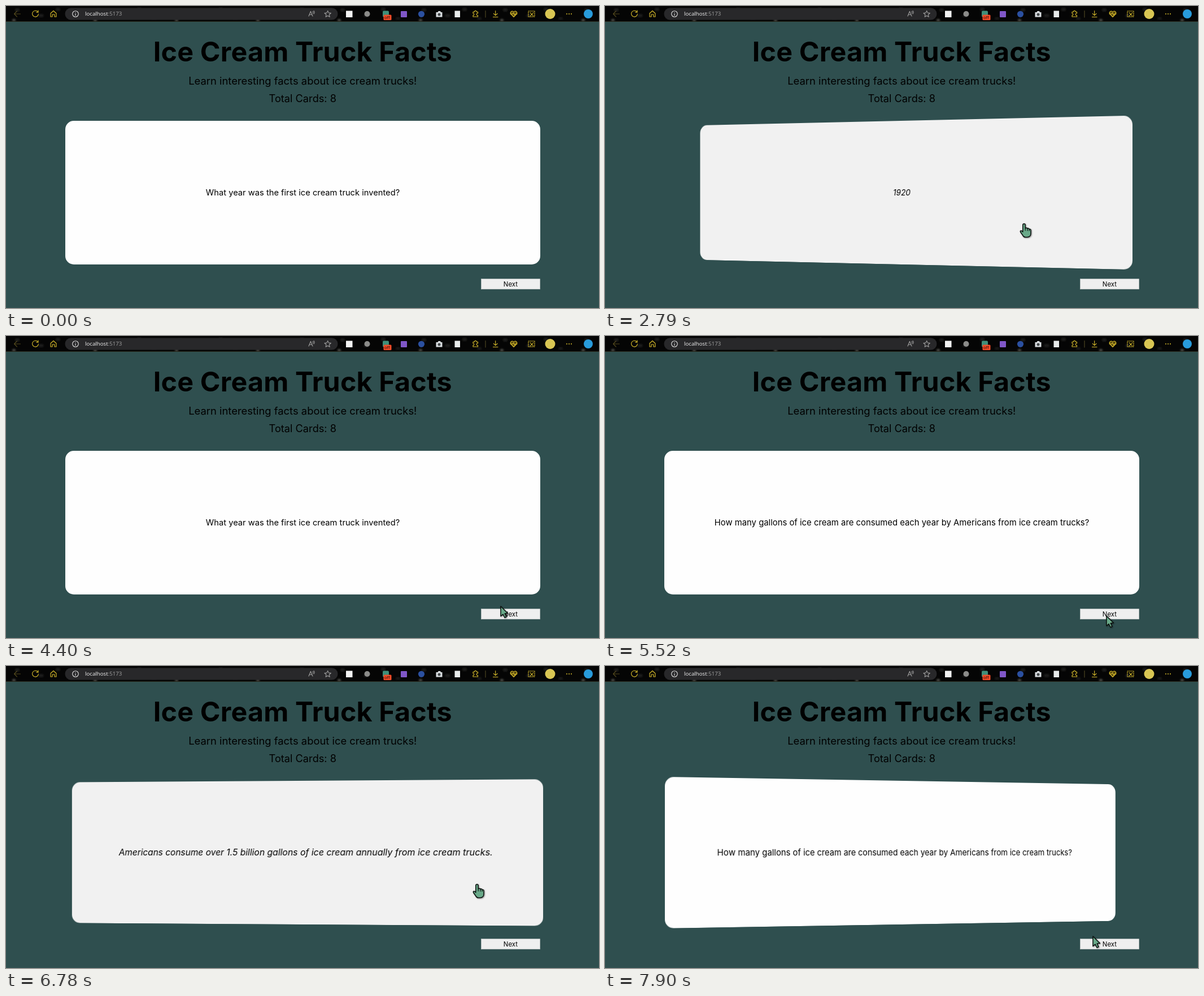
Animation of 1050x534 px, one loop 8000 ms. Source, as an HTML page:

```html
<!DOCTYPE html>
<html lang="en">
<head>
<meta charset="utf-8">
<title>Ice Cream Truck Facts</title>
<style>
  html, body { margin: 0; width: 100%; height: 100%; overflow: hidden; background: #2f4f4f; }
  svg { position: absolute; left: 0; top: 0; display: block; overflow: visible; }
  text { font-family: Inter, "Open Sans", sans-serif; text-anchor: middle; }
  .scene { position: absolute; left: 105px; top: 203px; width: 841px; height: 253.5px; perspective: 2640px; }
  .card { position: absolute; inset: 0; transform-style: preserve-3d; }
  .face { position: absolute; inset: 0; border-radius: 15px; backface-visibility: hidden; background: #fefefe; }
  .back { background: #f1f1f1; transform: rotateY(180deg); }
  .back text { font-style: italic; }
  .bar text { font-family: "Open Sans", "Noto Sans", sans-serif; text-anchor: start; }
  .line { fill: none; stroke: #d9bd2c; stroke-width: 1.1; stroke-linecap: round; stroke-linejoin: round; }
  .grey { stroke: #a0a0a0; }
  #pointer { filter: drop-shadow(1px 1px 1px rgba(0, 0, 0, .45)); }
  #pointer path { fill: #69a989; stroke: #0b100e; stroke-width: 1.5; stroke-linejoin: round; }
</style>
</head>
<body>
<svg class="bar" width="1050" height="534" viewBox="0 0 1050 534">
  <defs>
    <filter id="soft"><feGaussianBlur stdDeviation="1.4"/></filter>
    <pattern id="specks" width="144" height="28" patternUnits="userSpaceOnUse">
      <g fill="#1d1d1b" filter="url(#soft)">
        <ellipse cx="14" cy="25" rx="3" ry="2" fill="#55554f"/>
        <ellipse cx="20" cy="7" rx="4" ry="3"/>
        <ellipse cx="62" cy="17" rx="5" ry="3"/>
        <ellipse cx="92" cy="6" rx="4" ry="3"/>
        <ellipse cx="118" cy="22" rx="4" ry="2"/>
      </g>
    </pattern>
  </defs>
  <rect width="1050" height="28" fill="#050505"/>
  <rect width="1050" height="28" fill="url(#specks)"/>
  <rect y="27" width="1050" height="1" fill="#2b2d20"/>
  <rect x="104.5" y="3.5" width="483" height="21" rx="10.5" fill="#28282a"/>

  <path class="line" style="stroke:#54491d" d="M25.5 14H14.5M19.5 9L14.5 14L19.5 19"/>
  <path class="line" d="M56.3 10.4A5.4 5.4 0 1 0 57.4 14M57 7.8V11.2H53.6"/>
  <path class="line" d="M79 13L84 8.5L89 13V19H86V15H82V19H79Z"/>
  <g class="line" style="stroke:#e2e2e2"><circle cx="123" cy="14" r="5.3"/><path d="M123 13.5V16.7M123 11.3V11.4"/></g>
  <text x="140" y="17.4" font-size="9.7" fill="#f4f4f4">localhost<tspan fill="#a2a2a2">:5173</tspan></text>
  <g class="line grey">
    <path d="M536 18L539.5 9.5L543 18M537.2 15.2H541.8M543.3 9.5Q544.6 11.3 543.3 13M545 8.5Q547.2 11.2 545 14"/>
    <path id="star"/>
  </g>

  <rect x="602" y="8.5" width="11.5" height="11.5" fill="#f3f3f3"/>
  <circle cx="639.5" cy="14" r="5" fill="#8c8c8a"/>
  <rect x="667" y="8.5" width="11" height="11" rx="2" fill="#3f8f79"/>
  <rect x="668.5" y="15.5" width="14" height="9.5" rx="1.5" fill="#ee4b27"/>
  <text x="670" y="22.7" font-size="7.6" fill="#1c0803">off</text>
  <rect x="699" y="9" width="11" height="11" rx="1" fill="#8057c8"/>
  <circle cx="735.5" cy="14.3" r="5.6" fill="#2b50a0"/>
  <path fill="#d9dde0" d="M761.5 11H764.5L765.5 9H769L770 11H772.5V19.5H761.5Z"/>
  <circle cx="767" cy="15" r="2.5" fill="#45494c"/>
  <rect x="794.5" y="8.5" width="9.5" height="11.5" fill="#e9ecec"/>
  <path class="line" d="M827 10.5H829.5Q829.5 8.3 831.3 8.3T833 10.5H835.5V13Q833 13 833 14.8T835.5 16.5V19H827V16.5Q829 16.4 829 14.8T827 13Z"/>
  <path class="line" style="stroke:#544b24" d="M849 8.5V20"/>
  <path class="line" d="M866.7 8.5V16.5M863.3 13.3L866.7 16.7L870.1 13.3M862.5 19.5H871"/>
  <path class="line" style="fill:#57490f" d="M899 19.5L893.8 14C891.8 11 896 7 899 10.5C902 7 906.2 11 904.2 14Z"/>
  <path class="line" d="M893 14H897L898.5 12L900.5 16L902 14H905"/>
  <path class="line" stroke-dasharray="2 1.5" d="M925 9H936V19H925Z"/>
  <path class="line" d="M928 11.5L934 18M934 11.5L928 18"/>
  <circle cx="963.5" cy="14" r="9" fill="#d9c653"/>
  <g fill="#d9bd2c"><circle cx="993" cy="14" r="1"/><circle cx="997" cy="14" r="1"/><circle cx="1001" cy="14" r="1"/></g>
  <circle cx="1031" cy="14" r="8" fill="#289bdc"/>
</svg>

<svg width="1050" height="534" viewBox="0 0 1050 534">
  <text x="525.3" y="97.7" font-size="48.3" font-weight="700" letter-spacing=".2">Ice Cream Truck Facts</text>
  <text x="525.3" y="139.3" font-size="18.4">Learn interesting facts about ice cream trucks!</text>
  <text x="525.3" y="170.3" font-size="18.2">Total Cards: 8</text>
  <rect x="841.5" y="482.7" width="104" height="18" fill="#efefef" stroke="#c5caca" stroke-width=".7"/>
  <text x="893.4" y="495.8" font-size="11.4">Next</text>
</svg>

<div class="scene">
  <div class="card" id="card">
    <div class="face"><svg width="841" height="253.5"><text id="question" x="420.5" y="131.6"/></svg></div>
    <div class="face back"><svg width="841" height="253.5"><text id="answer" x="420.5" y="131.8"/></svg></div>
  </div>
</div>

<svg width="1050" height="534" viewBox="0 0 1050 534" style="pointer-events:none">
  <g id="pointer">
    <path id="arrow" d="M0 0V17.5L4 14L7 20L10 18.5L7.2 12.8L12.3 12.3Z"/>
    <g id="hand">
      <path d="M-2.2 13.5V2.2A2.2 2.2 0 0 1 2.2 2.2V8Q4.8 6.3 6 8.6Q8.3 7.2 9.2 9.7Q12 9 12 12V17Q12 23.5 5.5 23.8H2.5Q-.6 23.8-2.4 20.3L-6.3 14.8Q-7.4 12.4-5 12.2Q-3.7 12.2-2.2 14.5Z"/>
      <path style="fill:none;stroke-width:1.2" d="M2.2 8V12.5M6 8.6V12.8M9.2 9.7V13"/>
    </g>
  </g>
</svg>

<script>
const LOOP = 8000, STEP = 70, FLIP = 600, NEXT_AT = 5420;
const el = id => document.getElementById(id);
const [card, question, answer, pointer, arrow, hand] =
  ["card", "question", "answer", "pointer", "arrow", "hand"].map(el);

const facts = [
  { q: "What year was the first ice cream truck invented?", qSize: 14.7, a: "1920", aSize: 15 },
  { q: "How many gallons of ice cream are consumed each year by Americans from ice cream trucks?", qSize: 14.85,
    a: "Americans consume over 1.5 billion gallons of ice cream annually from ice cream trucks.", aSize: 15.95 }
];

// start time and direction of each turn
const flips = [[2450, 1], [3596, -1], [6332.5, 1], [7531, -1]];

// time, x, y of the pointer tip
const path = [
  [1080, 718, -30], [1640, 742, 385], [3750, 742, 385], [4400, 876, 478],
  [4700, 888, 495], [5790, 888, 495], [6010, 822, 363], [6430, 822, 363],
  [6700, 834, 386], [7540, 834, 386], [7900, 864, 478]
];

const clamp = v => Math.min(1, Math.max(0, v));
const smooth = u => u * u * (3 - 2 * u);
const bezier = (s, a, b) => 3 * s * (1 - s) ** 2 * a + 3 * s * s * (1 - s) * b + s ** 3;

// CSS "ease" curve
function ease(u) {
  if (u <= 0 || u >= 1) return clamp(u);
  let lo = 0, hi = 1;
  for (let i = 0; i < 24; i++) {
    const mid = (lo + hi) / 2;
    if (bezier(mid, .25, .25) < u) lo = mid; else hi = mid;
  }
  return bezier(lo, .1, 1);
}

function pointerAt(t) {
  let i = 0;
  while (i < path.length - 2 && t > path[i + 1][0]) i++;
  const [t0, x0, y0] = path[i], [t1, x1, y1] = path[i + 1];
  const k = smooth(clamp((t - t0) / (t1 - t0)));
  return [x0 + (x1 - x0) * k, y0 + (y1 - y0) * k];
}

function setText(node, text, size) {
  if (node.textContent !== text) node.textContent = text;
  node.setAttribute("font-size", size);
}

function draw(t) {
  const fact = facts[t < NEXT_AT ? 0 : 1];
  setText(question, fact.q, fact.qSize);
  setText(answer, fact.a, fact.aSize);

  const turn = flips.reduce((sum, [start, dir]) => sum + dir * ease((t - start) / FLIP), 0);
  card.style.transform = `rotateY(${turn * 180}deg)`;

  const [x, y] = pointerAt(t);
  const onCard = x > 105 && x < 946 && y > 203 && y < 456;
  pointer.setAttribute("transform", `translate(${x} ${y})`);
  arrow.style.display = onCard ? "none" : "";
  hand.style.display = onCard ? "" : "none";
}

const starPoints = Array.from({ length: 10 }, (_, i) => {
  const a = i * Math.PI / 5, r = i % 2 ? 2.8 : 6;
  return `${569.7 + r * Math.sin(a)} ${14.4 - r * Math.cos(a)}`;
});
el("star").setAttribute("d", `M${starPoints.join("L")}Z`);

function tick() {
  const t = performance.now() % LOOP;
  draw(Math.min(7900, Math.max(0, Math.floor((t + 10) / STEP) * STEP - 10)));
  requestAnimationFrame(tick);
}
tick();
</script>
</body>
</html>
```
